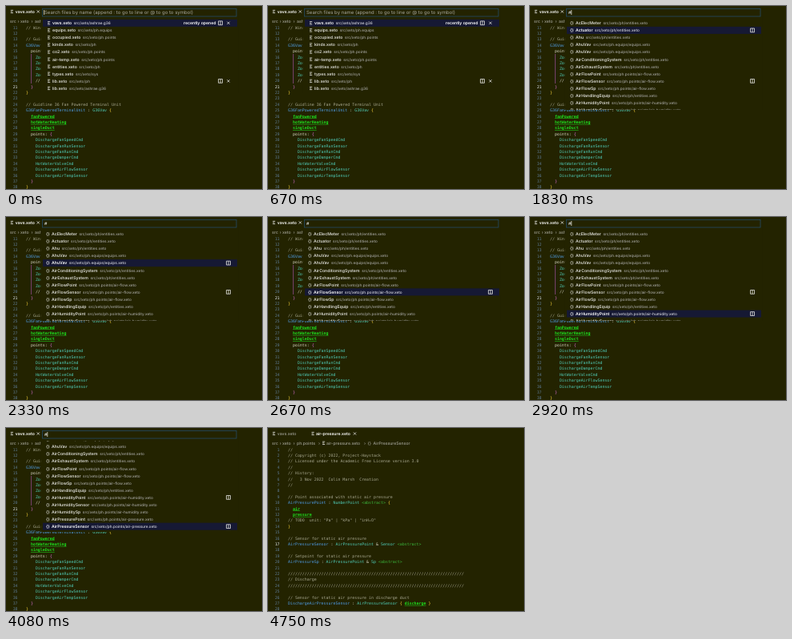
These frames come from a looping animation (320 px wide and 229 px high, 4830 ms). An HTML page:

```html
<!DOCTYPE html>
<html lang="en">
<head>
<meta charset="utf-8">
<title>Symbol search</title>
<style>
html, body { margin: 0; width: 100%; height: 100%; overflow: hidden; background: #232300; }
svg { display: block; width: 320px; height: 229px; }
text { white-space: pre; text-rendering: geometricPrecision; }
.ui { font: 600 5.15px Inter, "Open Sans", sans-serif; fill: #dcdcd8; }
.dim { fill: #a2a298; font-weight: 500; }
.white { fill: #fff; }
.hint { font-size: 6px; font-weight: 400; fill: #a8a8a0; }
.path { font-size: 4.75px; font-weight: 500; fill: #a4a4a0; }
.on .ui { fill: #fff; }
.on .path { fill: #d8d8e0; }
.code { font: 4.95px "DejaVu Sans Mono", "Noto Sans Mono", monospace; fill: #d8d8c8; }
.num { fill: #5c7890; text-anchor: end; }
.num.cur { fill: #e4ecf4; }
.comment { fill: #a8a890; }
.def { fill: #4f9ce6; }
.type { fill: #50ccb8; }
.meta { fill: #3cb83c; }
.marker { fill: #1ee01e; font-weight: bold; text-decoration: underline; }
.b0 { fill: #ffd83c; }
.b1 { fill: #da70d6; }
.line { fill: none; stroke: #e4e4e0; stroke-width: .8; }
.bar { fill: #161934; }
</style>
</head>
<body>
<svg viewBox="0 0 320 229" id="stage">
  <defs><clipPath id="clip"><rect x="43" y="16" width="247" height="114"/></clipPath></defs>
</svg>
<script>
const NS = 'http://www.w3.org/2000/svg';
const stage = document.getElementById('stage');
const BG = '#232300', ROW = 9.07, TOP = 21.3, LOOP = 4830, TYPED = 750, OPENED = 4420;

function add(parent, tag, attrs = {}, text) {
  const el = document.createElementNS(NS, tag);
  for (const k in attrs) el.setAttribute(k, attrs[k]);
  if (text !== undefined) el.textContent = text;
  parent.appendChild(el);
  return el;
}
const group = (parent, attrs) => add(parent, 'g', attrs);
const rect = (p, x, y, width, height, fill) => add(p, 'rect', { x, y, width, height, fill });
const line = (p, d) => add(p, 'path', { d, class: 'line' });
const ui = (p, x, y, text, cls = '') => add(p, 'text', { x, y: y + 1.9, class: 'ui ' + cls }, text);
const cross = (p, x, y) => line(p, `M${x - 1.6} ${y - 1.6}l3.2 3.2m0-3.2l-3.2 3.2`);
const split = (p, x, y) => line(p, `M${x - 2.5} ${y - 2.4}h5v4.8h-5zM${x} ${y - 2.4}v4.8`);
const fileIcon = (p, x, y) => line(p, `M${x} ${y - 1.7}h3.2m-3.2 1.7h2.4m-2.4 1.7h3.2`);

// Splits one line of code into coloured spans.
function codeLine(parent, src, y, depth) {
  const t = add(parent, 'text', { x: 25, y: y + 1.7, class: 'code' });
  const parts = src.match(/\/\/.*|<\w+>|[A-Z]\w*(?= :)|[A-Z]\w*|[a-z]\w*:?|[{}]|[^\w{}<]+/g) || [];
  for (const s of parts) {
    let cls = '';
    if (s.startsWith('//')) cls = 'comment';
    else if (s[0] === '<') cls = 'meta';
    else if (s === '{') cls = 'b' + depth++;
    else if (s === '}') cls = 'b' + --depth;
    else if (/^[A-Z]/.test(s)) cls = src.startsWith(s + ' :') ? 'def' : 'type';
    else if (/^[a-z]\w*$/.test(s)) cls = 'marker';
    add(t, 'tspan', { class: cls }, s);
  }
  return depth;
}

function editor(parent, first, current, lines) {
  let depth = 0;
  lines.forEach((src, i) => {
    const y = 26.8 + i * 7.4, n = first + i;
    add(parent, 'text', { x: 14.6, y: y + 1.7, class: 'code num' + (n === current ? ' cur' : '') }, n);
    depth = codeLine(parent, src, y, depth);
  });
}

function crumbs(parent, items) {
  items.forEach(([x, s]) => ui(parent, x, 18.8, s, 'dim'));
}

rect(stage, 0, 0, 320, 229, BG);

// First document
const vavs = group(stage);
fileIcon(vavs, 5.8, 7);
ui(vavs, 11.8, 7, 'vavs.xeto', 'white');
cross(vavs, 40.3, 7);
crumbs(vavs, [[5, 'src'], [14.5, '›'], [18, 'xeto'], [31.5, '›'], [36, 'ashrae.g36']]);
editor(vavs, 11, 21, [
  '// Windows', '', '// Guideline', 'G36Vav : Vav {', '  points: {',
  '    ZoneTemp', '    ZoneTempSp', '    ZoneOccupied', '    ZoneCo2', '    // Zone', '  }', '}', '',
  '// Guidline 36 Fan Powered Terminal Unit',
  'G36FanPoweredTerminalUnit : G36Vav {',
  '  fanPowered', '  hotWaterHeating', '  singleDuct', '  points: {',
  '    DischargeFanSpeedCmd', '    DischargeFanRunSensor', '    DischargeFanRunCmd',
  '    DischargeDamperCmd', '    HotWaterValveCmd', '    DischargeAirFlowSensor',
  '    DischargeAirTempSensor', '  }', '}'
]);
rect(vavs, 31, 60, .7, 37, '#9a509a');

// Second document
const pressure = group(stage);
ui(pressure, 11.8, 7, 'vavs.xeto', 'dim');
fileIcon(pressure, 5.8, 7);
fileIcon(pressure, 54.5, 7);
ui(pressure, 60, 7, 'air-pressure.xeto', 'white');
cross(pressure, 108.5, 7);
fileIcon(pressure, 68, 18.8);
crumbs(pressure, [[5, 'src'], [14.5, '›'], [18, 'xeto'], [31.5, '›'], [36, 'ph.points'], [63, '›'],
  [73, 'air-pressure.xeto'], [120, '›'], [124.5, '{}'], [131.5, 'AirPressureSensor']]);
const rule = '/'.repeat(74);
editor(pressure, 1, 17, [
  '//', '// Copyright (c) 2022, Project-Haystack',
  '// Licensed under the Academic Free License version 3.0', '//', '// History:',
  '//   3 Nov 2022  Colin Marsh  Creation', '//', '',
  '// Point associated with static air pressure',
  'AirPressurePoint : NumberPoint <abstract> {', '  air', '  pressure',
  '// TODO  unit: "Pa" | "kPa" | "inH₂O"', '}', '',
  '// Sensor for static air pressure', 'AirPressureSensor : AirPressurePoint & Sensor <abstract>', '',
  '// Setpoint for static air pressure', 'AirPressureSp : AirPressurePoint & Sp <abstract>', '',
  rule, '// Discharge', rule, '',
  '// Sensor for static air pressure in discharge duct',
  'DischargeAirPressureSensor : AirPressureSensor { discharge }', ''
]);

function panel(height) {
  const g = group(stage);
  rect(g, 43.3, 1, 247, height, BG);
  add(g, 'rect', { x: 45.5, y: 3.5, width: 242.5, height: 9.5, fill: BG, stroke: '#234a66', 'stroke-width': .8 });
  return g;
}

function entry(parent, i, label, path, x) {
  const g = group(parent), y = TOP + i * ROW;
  const bar = add(g, 'rect', { x: 46, y: y - ROW / 2, width: 243, height: ROW, class: 'bar' });
  const name = ui(g, x, y, label);
  ui(g, x + name.getComputedTextLength() + 2.6, y, path, 'path');
  return { g, bar, y };
}

// File picker
const files = panel(108);
ui(files, 48, 8, 'Search files by name (append : to go to line or @ to go to symbol)', 'hint');
const fileCaret = rect(files, 47.4, 5, .7, 6, '#fff');
[['vavs', 'ashrae.g36'], ['equips', 'ph.equips'], ['occupied', 'ph.points'], ['kinds', 'ph'],
 ['co2', 'ph.points'], ['air-temp', 'ph.points'], ['entities', 'ph'], ['types', 'sys'],
 ['lib', 'ph'], ['lib', 'ashrae.g36']].forEach(([name, dir], i) => {
  const { g, bar, y } = entry(files, i, name + '.xeto', 'src/xeto/' + dir, 58);
  fileIcon(g, 52, y);
  if (i) bar.remove();
  else {
    g.setAttribute('class', 'on');
    ui(g, 222, y, 'recently opened');
  }
  if (i === 0 || i === 8) {
    split(g, 268, y);
    cross(g, 278, y);
  }
});

// Symbol picker
const symbols = panel(129);
ui(symbols, 48, 8, '#');
const symbolCaret = rect(symbols, 51.5, 5, .7, 6, '#fff');
const list = group(group(symbols, { 'clip-path': 'url(#clip)' }));
const ENT = 'ph/entities', EQ = 'ph.equips/equips', FLOW = 'ph.points/air-flow',
  HUM = 'ph.points/air-humidity', PRES = 'ph.points/air-pressure';
const rows = [
  ['AcElecMeter', ENT], ['Actuator', ENT], ['Ahu', ENT], ['AhuVav', EQ], ['AhuVav', EQ],
  ['AirConditioningSystem', ENT], ['AirExhaustSystem', ENT],
  ['AirFlowPoint', FLOW], ['AirFlowSensor', FLOW], ['AirFlowSp', FLOW], ['AirHandlingEquip', ENT],
  ['AirHumidityPoint', HUM], ['AirHumiditySensor', HUM], ['AirHumiditySp', HUM],
  ['AirPressurePoint', PRES], ['AirPressureSensor', PRES], ['AirPressureSp', PRES]
].map(([name, file], i) => {
  const row = entry(list, i, name, `src/xeto/${file}.xeto`, 57);
  ui(row.g, 50, row.y, '{}');
  row.icon = split(row.g, 278, row.y);
  return row;
});

const show = (el, on) => { el.style.display = on ? '' : 'none'; };
const POINTER = 90.4;

// One key press, a pause, then steady key repeat.
function selected(t) {
  if (t < 1670) return 0;
  if (t < 2160) return 1;
  return Math.min(15, 2 + Math.floor((t - 2160) / 83.3));
}

const blink = t => t % 1000 < 500;

function draw(now) {
  const t = now % LOOP, opened = t >= OPENED, typed = t >= TYPED;
  show(vavs, !opened);
  show(pressure, opened);
  show(files, !typed);
  show(symbols, typed && !opened);
  show(fileCaret, blink(t));
  show(symbolCaret, blink(t - TYPED));
  const sel = selected(t);
  const scroll = sel > 11 ? (sel - 11) * ROW - 2.1 : 0;
  list.setAttribute('transform', `translate(0 ${-scroll})`);
  rows.forEach((row, i) => {
    const on = i === sel;
    const hover = Math.abs(row.y - scroll - POINTER) < ROW / 2;
    row.g.setAttribute('class', on ? 'on' : '');
    show(row.bar, on);
    show(row.icon, on || hover);
  });
}

const start = performance.now();
function tick() {
  draw(performance.now() - start);
  requestAnimationFrame(tick);
}
tick();
</script>
</body>
</html>
```
